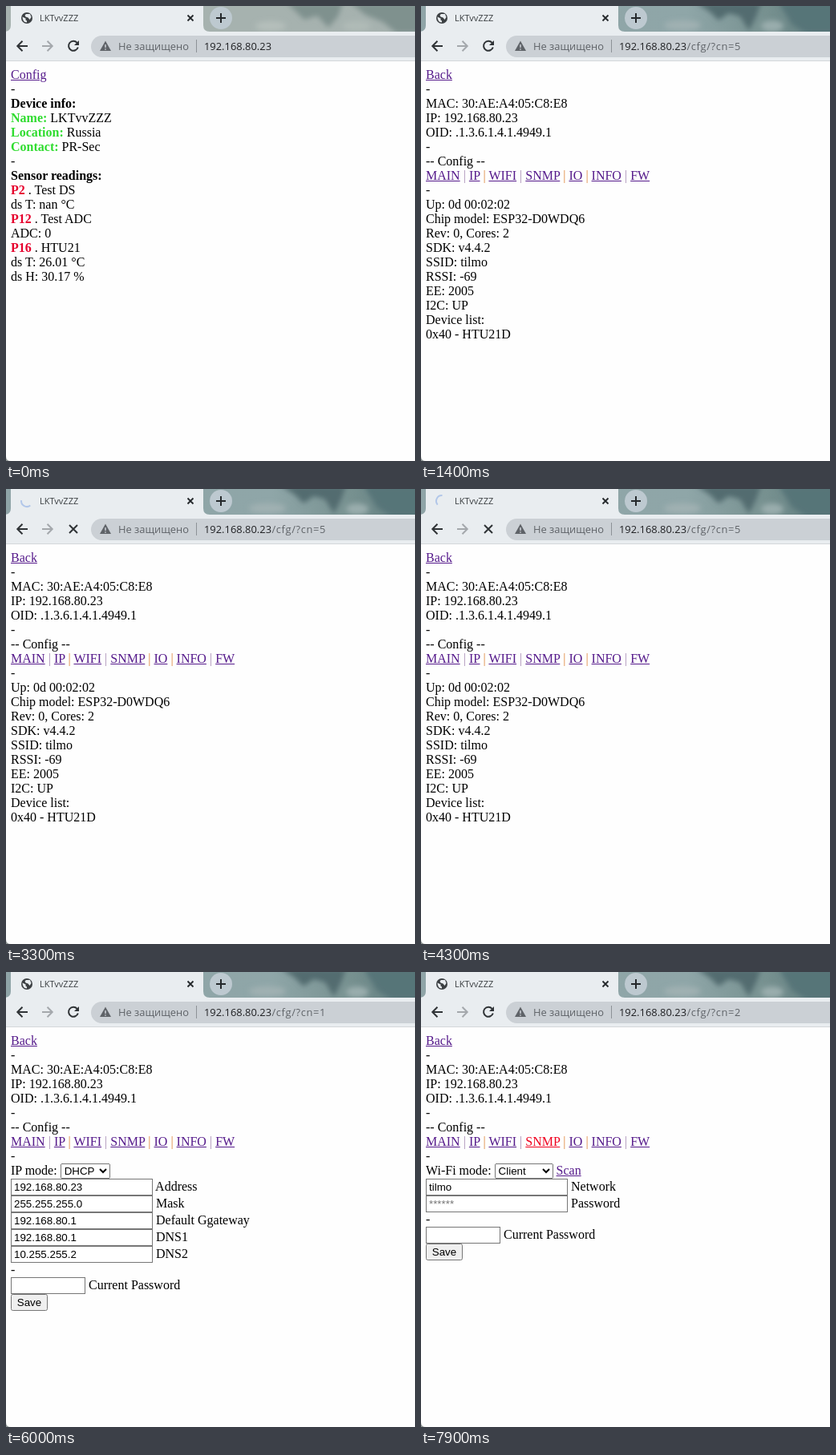
Recreate the animation shown at these times as an HTML page. Size 510 by 568 pixels, loop 8000 ms.

```html
<!DOCTYPE html>
<html lang="ru">
<head>
<meta charset="utf-8">
<title>Device config</title>
<style>
html, body { margin: 0; width: 100%; height: 100%; overflow: hidden; background: #fefefe; }
#stage { position: relative; width: 510px; height: 568px; overflow: hidden; background: #fefefe; }
svg { position: absolute; left: 0; top: 0; }
svg text { font: 12.9px "Open Sans", "Noto Sans", sans-serif; fill: #5f6368; }
#page { position: absolute; left: 6px; top: 77px; width: 500px;
  font: 16px/18px "Liberation Serif", "Times New Roman", serif; color: #000; }
#page div { height: 18px; white-space: pre; }
#page .field { height: 21px; line-height: 20px; }
#page .choice { height: 19px; }
input, select, button { box-sizing: border-box; margin: 0; height: 21px; vertical-align: top;
  font: 13.333px "Liberation Sans", Arial, sans-serif; pointer-events: none; }
input { width: 177px; border: 1px solid #767676; padding: 1px 3px; background: #fff; color: #000; }
input.short { width: 93px; }
input::placeholder { color: #757575; opacity: 1; }
select { height: 19px; }
button { width: 46px; padding: 0; }
u { color: #551a8b; }
u.hot { color: #f0001e; }
.name { color: #2fdc2f; font-weight: bold; }
.port { color: #e6002c; font-weight: bold; }
.bar { color: #a78bb4; }
.bar.warm { color: #de8238; }
[hidden] { display: none !important; }
.hide { display: none; }
</style>
</head>
<body>
<div id="stage">
  <svg width="510" height="568" viewBox="0 0 510 568">
    <defs>
      <filter id="soft" x="-20%" y="-50%" width="140%" height="200%"><feGaussianBlur stdDeviation="3"/></filter>
      <linearGradient id="teal">
        <stop offset="0" stop-color="#8fa4a7"/><stop offset=".65" stop-color="#8fa6a8"/>
        <stop offset=".85" stop-color="#76908f"/><stop offset="1" stop-color="#5d7a7d"/>
      </linearGradient>
    </defs>
    <g id="pale">
      <rect width="510" height="34" fill="#a6b2af"/>
      <g filter="url(#soft)" fill="#7f918e">
        <path d="M350 -4H420L414 13 402 27 388 12 372 17Z"/>
        <path d="M430 -4H518V34H487L470 20 448 11Z"/>
        <ellipse cx="330" cy="25" rx="19" ry="6" fill="#b5bfbb"/>
        <ellipse cx="437" cy="25" rx="18" ry="6" fill="#b0bbb7"/>
      </g>
    </g>
    <g id="deep" class="hide">
      <rect width="510" height="34" fill="url(#teal)"/>
      <g filter="url(#soft)" fill="#526c70">
        <path d="M343 -4H424L418 13 409 31 398 13 384 9 371 18 360 7Z"/>
        <path d="M446 -4H518V36H484L463 23Z" fill="#567478"/>
        <ellipse cx="326" cy="24" rx="23" ry="6" fill="#a0b1b2"/>
        <ellipse cx="438" cy="25" rx="14" ry="7" fill="#9aadad"/>
      </g>
    </g>

    <path d="M-2 32Q6 32 6 24V0H246V24Q246 32 254 32H510V69H0V32Z" fill="#e9edf0"/>
    <path d="M0 68.5H510" stroke="#d3d7da"/>
    <circle cx="268" cy="15" r="14" fill="#bdc9d0"/>
    <path d="M262 15H274M268 9V21" stroke="#24282b" stroke-width="2"/>
    <path d="M226.5 11.5L233.5 18.5M233.5 11.5L226.5 18.5" stroke="#24282b" stroke-width="1.8"/>
    <text id="title" x="42" y="19" style="font-size:11px;fill:#3c4043"></text>

    <g id="globe">
      <circle cx="26" cy="15" r="7" fill="#3c4043"/>
      <path d="M20.5 13.5L24.5 15.5V17.5L26 18.5V20.5Q20.5 20 20.5 13.5ZM25 10H30L31.5 14 29.5 17 27.5 14.5 24.5 13.5 23.5 11.5Z" fill="#e9edf0"/>
    </g>
    <path id="spinner" fill="none" stroke="#b2c7e9" stroke-width="2"/>

    <g fill="none" stroke="#2f3336" stroke-width="2">
      <path d="M27 50H14.5M20.5 43.8L14.3 50L20.5 56.2"/>
      <path d="M45 50H57.5M51.5 43.8L57.7 50L51.5 56.2" stroke="#a4a8ac"/>
      <g id="reload">
        <path d="M88.6 45.8A6 6 0 1 0 89.8 51.5"/>
        <path d="M91 43V49H85Z" fill="#2f3336" stroke="none"/>
      </g>
      <path id="stop" d="M79 45L89 55M89 45L79 55"/>
    </g>

    <rect x="106" y="37" width="430" height="27" rx="13.5" fill="#cbd0d5"/>
    <path d="M124 43.5L131 56H117Z" fill="#5f6368"/>
    <path d="M124 48V52M124 53.2V54.8" stroke="#cbd0d5" stroke-width="1.5"/>
    <text x="140" y="55">Не защищено</text>
    <path d="M237.5 42V58" stroke="#8d9297"/>
    <text x="247" y="55" style="fill:#202124">192.168.80.23</text>
    <text id="path" x="331.5" y="55" style="letter-spacing:.6px"></text>
    <path d="M0 562Q0 568 6 568H0Z" fill="#8b9291"/>
  </svg>
  <div id="page"></div>
</div>

<script>
const LOOP = 8000, TICK = 100, REVOLUTION = 1320, MAX_SWEEP = 135;
const HOST = 'LKTvvZZZ', CONTACT = 'PR-Sec', NETWORK = 'tilmo';
const $ = id => document.getElementById(id);

const line = html => `<div>${html}</div>`;
const lines = (...items) => items.map(line).join('');
const link = text => `<u data-link="${text}">${text}</u>`;
const label = (cls, text) => `<span class="${cls}">${text}</span>`;
const field = (value, text) => `<div class="field"><input tabindex="-1" value="${value}"> ${text}</div>`;
const secret = (text, cls = 'short', hint = '******') =>
  `<div class="field"><input tabindex="-1" class="${cls}" placeholder="${hint}"> ${text}</div>`;
const choice = (text, value, width, tail = '') =>
  `<div class="choice">${text} <select tabindex="-1" style="width:${width}px"><option>${value}</select>${tail}</div>`;
const section = (name, html) => `<section data-page="${name}">${html}</section>`;

const dash = line('-');
const save = dash + secret('Current Password', 'short', '') +
  '<div class="field"><button tabindex="-1">Save</button></div>';
const bars = ['', 'warm', '', 'warm', 'warm', ''];
const menu = ['MAIN', 'IP', 'WIFI', 'SNMP', 'IO', 'INFO', 'FW']
  .map((text, i) => link(text) + (i < 6 ? label('bar ' + bars[i], ' | ') : '')).join('');

$('title').textContent = HOST;
$('page').innerHTML =
  section('home', lines(
    link('Config'), '-', '<b>Device info:</b>',
    label('name', 'Name:') + ' ' + HOST,
    label('name', 'Location:') + ' Russia',
    label('name', 'Contact:') + ' ' + CONTACT,
    '-', '<b>Sensor readings:</b>',
    label('port', 'P2') + ' . Test DS', 'ds T: nan °C',
    label('port', 'P12') + ' . Test ADC', 'ADC: 0',
    label('port', 'P16') + ' . HTU21', 'ds T: 26.01 °C', 'ds H: 30.17 %')) +
  section('config', lines(
    link('Back'), '-', 'MAC: 30:AE:A4:05:C8:E8', 'IP: 192.168.80.23',
    'OID: .1.3.6.1.4.1.4949.1', '-', '-- Config --', menu, '-')) +
  section('info', lines(
    'Up: 0d 00:02:02', 'Chip model: ESP32-D0WDQ6', 'Rev: 0, Cores: 2', 'SDK: v4.4.2',
    'SSID: ' + NETWORK, 'RSSI: -69', 'EE: 2005', 'I2C: UP', 'Device list:', '0x40 - HTU21D')) +
  section('main',
    field(HOST, 'Name') + field('Russia', 'Location') + field(CONTACT, 'Contact') + dash +
    secret('New password') + secret('Confirm password') + save) +
  section('ip',
    choice('IP mode:', 'DHCP', 62) + field('192.168.80.23', 'Address') +
    field('255.255.255.0', 'Mask') + field('192.168.80.1', 'Default Ggateway') +
    field('192.168.80.1', 'DNS1') + field('10.255.255.2', 'DNS2') + save) +
  section('wifi',
    choice('Wi-Fi mode:', 'Client', 73, ' ' + link('Scan')) +
    field(NETWORK, 'Network') + secret('Password', '') + save);

// Each visit: page shown from `at`, link pressed at `press`, loading from `load`.
const visits = [
  { at: 0, page: 'home', path: '', press: 1200, load: 1300, next: 'Config' },
  { at: 1400, page: 'info', path: '/cfg/?cn=5', press: 2400, load: 2500, next: 'MAIN' },
  { at: 4400, page: 'main', path: '/cfg/?cn=0', press: 5700, load: 5800, next: 'IP' },
  { at: 6000, page: 'ip', path: '/cfg/?cn=1', press: 6900, load: 7000, next: 'WIFI' },
  { at: 7200, page: 'wifi', path: '/cfg/?cn=2', press: 7900, load: 8000, next: 'SNMP' }
];
const sections = [...document.querySelectorAll('section')];
const links = [...document.querySelectorAll('u')];
const show = (id, on) => $(id).classList.toggle('hide', !on);

// The arc grows counter-clockwise from the top, then keeps its length.
function arc(elapsed) {
  const turn = 360 * elapsed / REVOLUTION;
  const sweep = Math.max(1, Math.min(turn, MAX_SWEEP));
  const point = deg => {
    const a = deg * Math.PI / 180;
    return `${(26 + 7 * Math.cos(a)).toFixed(2)} ${(15 - 7 * Math.sin(a)).toFixed(2)}`;
  };
  return `M${point(90 + turn - sweep)}A7 7 0 0 0 ${point(90 + turn)}`;
}

let last = -1;
function draw(now) {
  const t = Math.floor(now % LOOP / TICK) * TICK;
  if (t !== last) {
    last = t;
    const visit = visits.filter(v => v.at <= t).pop();
    const home = visit.page === 'home';
    const loading = t >= visit.load;
    const hot = t >= visit.press && !loading ? visit.next : '';
    for (const s of sections)
      s.hidden = s.dataset.page !== visit.page && (home || s.dataset.page !== 'config');
    for (const a of links) a.classList.toggle('hot', a.dataset.link === hot);
    $('path').textContent = visit.path;
    show('pale', home);
    show('deep', !home);
    show('globe', !loading);
    show('reload', !loading);
    show('stop', loading);
    show('spinner', loading);
    if (loading) $('spinner').setAttribute('d', arc(t - visit.load));
  }
  requestAnimationFrame(draw);
}
draw(0);
</script>
</body>
</html>
```
